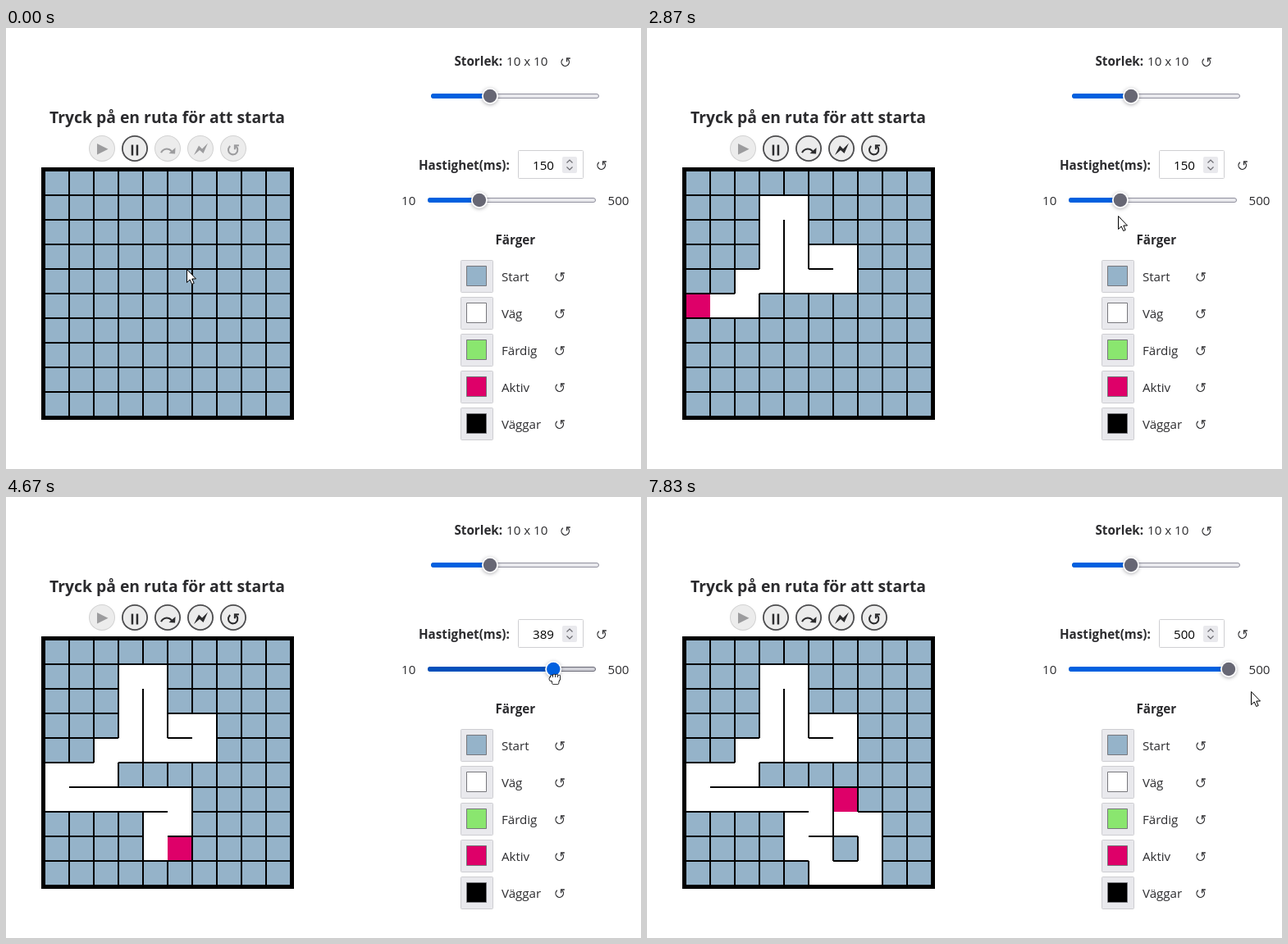
Write an HTML page with a canvas that moves like this. It is 774 px wide and 538 px high and loops after 8 s.

```html
<!DOCTYPE html>
<html lang="sv">
<head>
<meta charset="utf-8">
<title>Labyrint</title>
<style>
  html, body { margin: 0; width: 100%; height: 100%; overflow: hidden; background: #fff; }
  canvas { display: block; width: 774px; height: 538px; }
</style>
</head>
<body>
<canvas id="stage" width="774" height="538"></canvas>
<script>
const ctx = document.getElementById('stage').getContext('2d');
const LOOP = 8000, CELL = 30, SIZE = 10, LEFT = 47, TOP = 174;
const FONT = '"Open Sans", "Noto Sans", sans-serif';
const INK = '#2b2b2e', FACE = '#e9e9ed';
const START = '#95b3c9', PATH = '#fff', DONE = '#8ae66f', ACTIVE = '#de0069', WALL = '#000';

// Pointer moves: from, until, x, y, power of the ease
const MOVES = [
  [0, 270, 207, 276, 1],
  [740, 930, 334, 282, 1],
  [930, 1430, 571, 262, 1],
  [1900, 2150, 574, 229, 1],
  [3170, 3430, 580, 213, 1],
  [3800, 4998, 745, 219, 2],
  [5430, 5570, 736, 237, 1],
];
const HOVER = 3300, DRAG = 3800, DROP = 5300, LEAVE = 5480;

function pointerAt(t) {
  let x = 220, y = 294;
  for (const [from, until, toX, toY, power] of MOVES) {
    const k = Math.min(1, Math.max(0, (t - from) / (until - from))) ** power;
    x += (toX - x) * k;
    y += (toY - y) * k;
  }
  return [x, y];
}

const thumbAt = t => t < DRAG ? 576.9 : Math.min(709, pointerAt(t)[0]);
const delayAt = t => Math.round(10 + 490 * (thumbAt(t) - 524) / 185);

// The maze walk; every step waits for the delay set on the slider.
const STEP = { R: [1, 0], L: [-1, 0], U: [0, -1], D: [0, 1] };
const walk = [{ c: 5, r: 3, at: 465 }];
for (const dir of 'RDLLUUULDDDLDLLDRRRRRDLDRDRRUULU') {
  const { c, r, at } = walk[walk.length - 1], [dx, dy] = STEP[dir];
  walk.push({ c: c + dx, r: r + dy, at: at + Math.max(158, delayAt(at)) });
}

function text(s, x, y, size = 15.1, weight = 400, color = INK) {
  ctx.font = `${weight} ${size}px ${FONT}`;
  ctx.fillStyle = color;
  ctx.fillText(s, x, y);
}

function rounded(x, y, w, h, radius, fill) {
  ctx.beginPath();
  ctx.roundRect(x, y, w, h, radius);
  ctx.fillStyle = fill;
  ctx.fill();
}

function box(x, y, w, h, fill, border, radius = 0) {
  rounded(x + .5, y + .5, w - 1, h - 1, radius, fill);
  ctx.strokeStyle = border;
  ctx.lineWidth = 1;
  ctx.stroke();
}

function disc(x, y, r, fill) {
  ctx.beginPath();
  ctx.arc(x, y, r, 0, Math.PI * 2);
  ctx.fillStyle = fill;
  ctx.fill();
}

function line(points, color, width) {
  ctx.beginPath();
  points.forEach(([x, y]) => ctx.lineTo(x, y));
  ctx.strokeStyle = color;
  ctx.lineWidth = width;
  ctx.stroke();
}

function shape(points, fill, outline = 'transparent') {
  ctx.beginPath();
  points.forEach(([x, y]) => ctx.lineTo(x, y));
  ctx.closePath();
  ctx.fillStyle = fill;
  ctx.fill();
  ctx.strokeStyle = outline;
  ctx.lineWidth = 1;
  ctx.stroke();
}

// Anticlockwise arrow: gap at the upper left, head at the upper right
function resetIcon(x, y, color = INK, scale = 1, width = 1.3) {
  ctx.save();
  ctx.translate(x, y);
  ctx.scale(scale, scale);
  ctx.beginPath();
  ctx.arc(-.3, .6, 4.7, -.28 * Math.PI, 1.3 * Math.PI);
  ctx.strokeStyle = color;
  ctx.lineWidth = width;
  ctx.stroke();
  line([[5.8, -4], [1.6, -4], [1.6, .2]], color, width);
  ctx.restore();
}

function skipIcon(color) {
  ctx.beginPath();
  ctx.arc(196, 155, 7.5, 1.12 * Math.PI, 1.8 * Math.PI);
  ctx.strokeStyle = color;
  ctx.lineWidth = 2;
  ctx.stroke();
  shape([[206.5, 146], [206, 153.5], [198.5, 153]], color);
}

function buttons(running) {
  const icons = [
    c => shape([[111, 141], [124.5, 147.8], [111, 154.5]], c),
    c => [152.7, 158.7].forEach(x => rounded(x, 142.5, 2.5, 13, 0, c)),
    skipIcon,
    c => shape([[229, 155], [235, 143.5], [239, 147.5], [246, 140.5], [240.5, 153], [236, 149]], c),
    c => resetIcon(277, 148, c, 1.2, 1.7),
  ];
  icons.forEach((icon, i) => {
    const x = 117 + 40 * i, on = i === 1 || (i > 1 && running);
    disc(x, 147, 16, on ? '#4c4c4e' : '#d2d2d2');
    disc(x, 147, on ? 14.2 : 15, '#ececec');
    icon(on ? '#2c2c2e' : '#9c9c9e');
  });
}

function slider(x, y, thumb, mode = 'idle') {
  const idle = mode === 'idle';
  box(x, y - 3, 205, 6, idle ? FACE : '#d0d0d7', idle ? '#8f8f9d' : '#676774', 2.5);
  rounded(x, y - 3, thumb - x, 6, 3, idle ? '#0060df' : '#0250bb');
  ctx.save();
  ctx.shadowColor = 'rgba(58,57,68,.4)';
  ctx.shadowBlur = 4;
  ctx.shadowOffsetY = 1;
  disc(thumb, y, 10, '#fff');
  ctx.restore();
  disc(thumb, y, 8.2, { idle: '#676774', hover: '#484851', drag: '#0060df' }[mode]);
}

function panel(t) {
  text('Storlek:', 546.5, 46, 15.2, 700);
  text('10 x 10', 610, 46);
  resetIcon(682, 41);
  slider(518, 83, 590);

  text('Hastighet(ms):', 503, 173, 15.2, 700);
  box(624, 149, 80, 35, '#fff', '#cfcfd2', 1);
  text(String(delayAt(t)), 642, 173, 15.1, 400, '#000');
  rounded(678, 157, 18, 20, 2, FACE);
  for (const d of [-1, 1]) {
    line([[683.5, 167 + 2.5 * d], [687, 167 + 6 * d], [690.5, 167 + 2.5 * d]], '#6c6c72', 1.2);
  }
  resetIcon(726, 167);
  text('10', 482, 216);
  text('500', 733.5, 216);
  const mode = t < HOVER || t >= DROP ? 'idle' : t < DRAG ? 'hover' : 'drag';
  slider(514, 210, thumbAt(t), mode);

  text('Färger', 596.5, 264, 15.2, 700);
  const colors = { Start: START, Väg: PATH, Färdig: DONE, Aktiv: ACTIVE, Väggar: WALL };
  Object.entries(colors).forEach(([name, color], i) => {
    const y = 283 + 45 * i;
    box(554, y, 40, 40, FACE, '#cdcdd1', 1);
    box(561, y + 7, 25, 25, color, '#77777c');
    text(name, 604, y + 26);
    resetIcon(675, y + 20);
  });
}

function maze(step) {
  ctx.fillStyle = WALL;
  ctx.fillRect(LEFT - 4, TOP - 4, 308, 308);
  ctx.fillStyle = START;
  ctx.fillRect(LEFT, TOP, 300, 300);

  const open = new Set();
  for (let i = 0; i <= step; i++) {
    const { c, r } = walk[i];
    ctx.fillStyle = i === step ? ACTIVE : PATH;
    ctx.fillRect(LEFT + c * CELL, TOP + r * CELL, CELL, CELL);
    if (!i) continue;
    const last = walk[i - 1];
    open.add(last.r === r ? `v${Math.max(c, last.c)},${r}` : `h${c},${Math.max(r, last.r)}`);
  }

  ctx.fillStyle = WALL;
  for (let a = 0; a <= SIZE; a++) {
    for (let b = 0; b < SIZE; b++) {
      const edge = a * CELL - 1, from = b * CELL;
      if (!open.has(`v${a},${b}`)) ctx.fillRect(LEFT + edge, TOP + from, 2, CELL);
      if (!open.has(`h${b},${a}`)) ctx.fillRect(LEFT + from, TOP + edge, CELL, 2);
    }
  }
}

function arrow() {
  shape([[.5, .5], [.5, 16.5], [4.2, 13], [6.7, 18.5], [9.2, 17.4], [6.8, 12], [11.5, 12]],
    '#fff', '#000');
}

// Four fingers over a palm, drawn first as an outline and then filled
function hand(reach) {
  for (const [grow, fill] of [[.8, '#000'], [0, '#fff']]) {
    const part = (x, y, w, h, r) =>
      rounded(x - grow, y - grow, w + 2 * grow, h + 2 * grow, r + grow, fill);
    for (let i = 0; i < 4; i++) {
      const tip = -2 - reach + Math.abs(i - 1.5);
      part(-4.5 + 3 * i, tip, 2.2, 4 - tip, 1.1);
    }
    part(-6, 1, 3, 4, 1.5);
    part(-4, 1, 10, 5, 2);
    part(-2.5, 4, 7.5, 5, 1);
  }
}

function beam() {
  line([[.5, -7], [.5, 8]], '#000', 1);
  for (const y of [-7.5, 8.5]) {
    line([[-3, y], [0, y]], '#000', 1);
    line([[1, y], [4, y]], '#000', 1);
  }
}

function pointer(t) {
  const [x, y] = pointerAt(t);
  ctx.save();
  ctx.translate(Math.round(x), Math.round(y));
  if (t < HOVER || t >= LEAVE) {
    arrow();
  } else if (t < DROP) {
    const held = t >= DRAG;
    ctx.translate(1.5, held ? 3 : 1);
    hand(held ? 1 : 5);
  } else {
    beam();
  }
  ctx.restore();
}

function draw() {
  const t = performance.now() % LOOP;
  const step = walk.filter(cell => cell.at <= t).length - 1;
  ctx.fillStyle = '#fff';
  ctx.fillRect(0, 0, 774, 538);
  text('Tryck på en ruta för att starta', 53, 115.5, 19.35, 700);
  buttons(step >= 0);
  maze(step);
  panel(t);
  pointer(t);
  requestAnimationFrame(draw);
}
draw();
</script>
</body>
</html>
```
